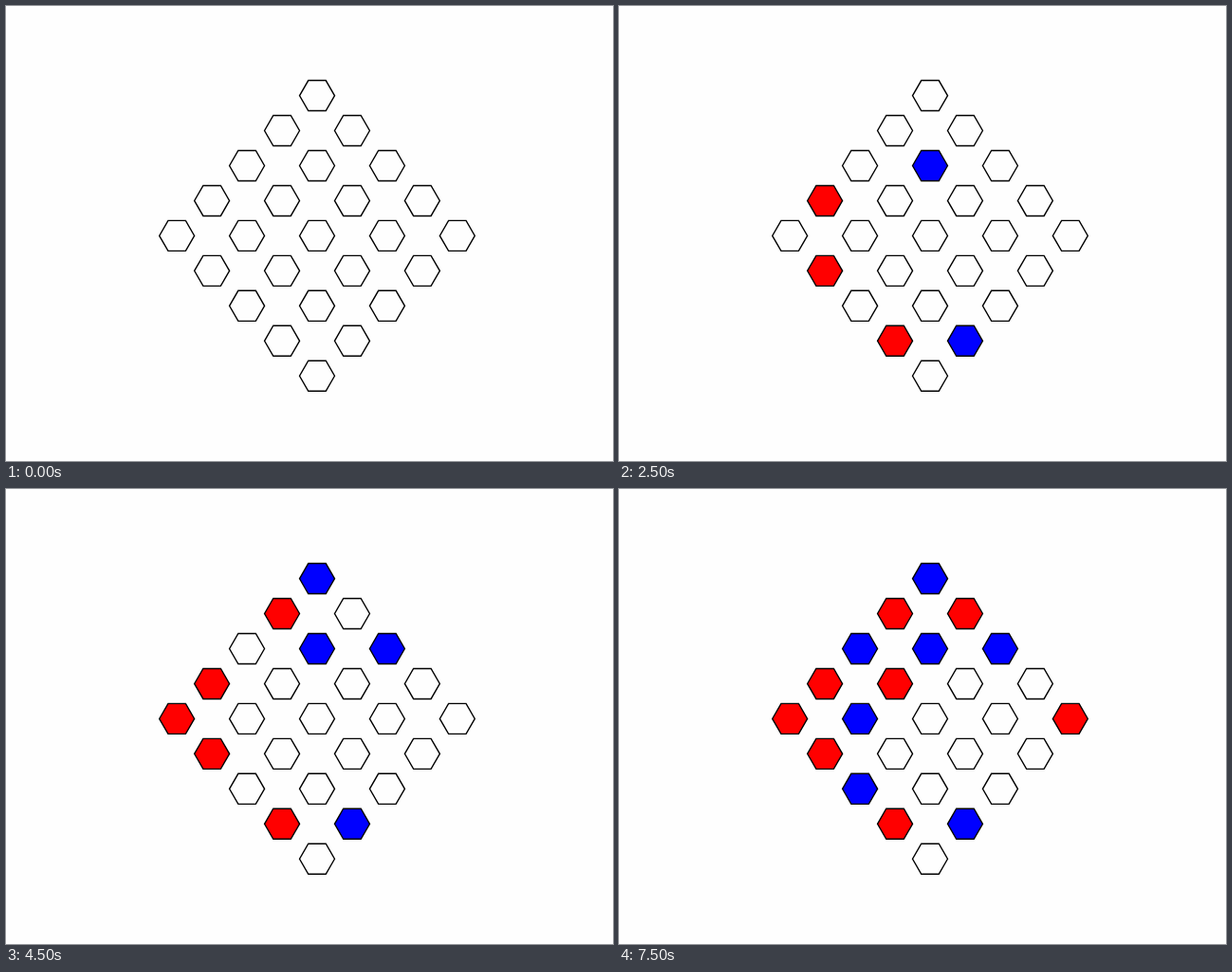
These frames come from a looping animation (640 px wide and 480 px high, 8000 ms). An HTML page with a canvas:

```html
<!DOCTYPE html>
<html lang="en">
<head>
<meta charset="utf-8">
<title>Hexagon board</title>
<style>
  html, body { margin: 0; width: 100%; height: 100%; overflow: hidden; background: #fefefe; }
  canvas { display: block; }
</style>
</head>
<body>
<canvas id="board" width="640" height="480"></canvas>
<script>
const ctx = document.getElementById('board').getContext('2d');
const SIZE = 5, STEP = 36.96, RADIUS = STEP / 2;
const CENTER_X = 328, CENTER_Y = 242.4;
const TURN = 500, LOOP = 8000, EMPTY = '#fefefe';
const PLAYERS = ['#f00', '#00f'];

// Cells are lettered A to Y along the diagonals; the players take turns.
const GAME = 'JGTXDAEKBIFOUCH';

function hexagon(x, y, fill) {
  ctx.beginPath();
  for (let i = 0; i < 6; i++) {
    const angle = i * Math.PI / 3;
    ctx.lineTo(x + RADIUS * Math.cos(angle), y + RADIUS * Math.sin(angle));
  }
  ctx.closePath();
  ctx.fillStyle = fill;
  ctx.fill();
  ctx.stroke();
}

function draw(time) {
  const played = GAME.slice(0, Math.floor(time % LOOP / TURN));
  ctx.fillStyle = EMPTY;
  ctx.fillRect(0, 0, 640, 480);
  ctx.lineWidth = 100 / 72;
  for (let cell = 0; cell < SIZE * SIZE; cell++) {
    const a = Math.floor(cell / SIZE), b = cell % SIZE;
    const turn = played.indexOf(String.fromCharCode(65 + cell));
    hexagon(CENTER_X + (a - b) * STEP,
            CENTER_Y + (a + b + 1 - SIZE) * STEP,
            turn < 0 ? EMPTY : PLAYERS[turn % 2]);
  }
}

function tick() {
  draw(performance.now());
  requestAnimationFrame(tick);
}
tick();
</script>
</body>
</html>
```
